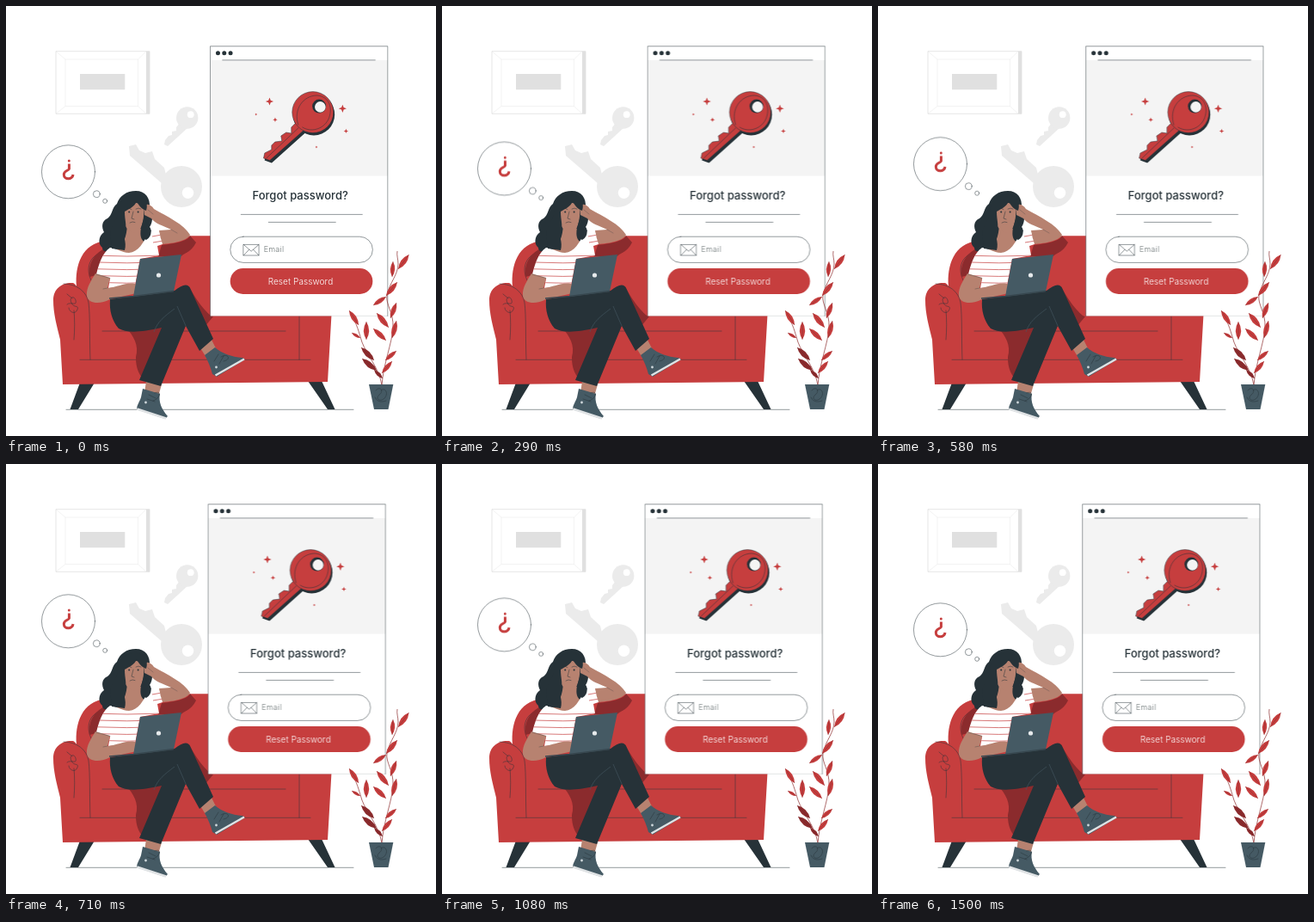
Recreate the animation shown at these times as an HTML page. Size 500 px wide and 500 px high, loop 1540 ms.

```html
<!DOCTYPE html>
<html lang="en">
<head>
<meta charset="utf-8">
<title>Forgot password</title>
<style>
  html, body { margin: 0; width: 100%; height: 100%; overflow: hidden; background: #fff; }
  svg { display: block; width: 100%; height: 100%; }
  text { font-family: Inter, "Open Sans", sans-serif; }
  .red { fill: #c63e3e; }
  .deep { fill: #8b2b2d; }
  .dark { fill: #263238; }
  .slate { fill: #455a64; }
  .skin { fill: #b78270; }
  .pale { fill: #ebebeb; }
  .white { fill: #fff; }
  .line { fill: none; stroke: #263238; stroke-width: .5; stroke-linecap: round; stroke-linejoin: round; }
  .frame { fill: none; stroke: #e0e0e0; stroke-width: .8; }
  .sole { fill: none; stroke: #e0e3e5; stroke-width: 2.4; }
</style>
</head>
<body>
<svg viewBox="0 0 500 500">
  <defs>
    <clipPath id="shirtClip">
      <path id="shirtShape" d="M121 281C112 287 108 300 105 312L121 317L119 328L150 325L156 294L178 290L176 279L182 277L177 260L166 263C160 275 154 286 143 287C134 287 128 281 121 281Z"/>
    </clipPath>
  </defs>

  <g id="picture">
    <path class="frame" d="M58 52.7H167V125.3H58Z"/>
    <path fill="#e0e0e0" d="M163 52.7H167V125.3H163Z"/>
    <path class="frame" stroke-opacity=".5" d="M69 62H153.5V116.5H69ZM58 52.7L69 62M163 52.7L153.5 62M58 125.3L69 116.5M163 125.3L153.5 116.5"/>
    <path fill="#e0e0e0" d="M86 79H138.3V97.2H86Z"/>
  </g>

  <g class="pale">
    <path d="M202 136L198 141V145L193 146L193 150L189 151L185 156L184 161L188 163L211 142Z"/>
    <circle cx="210.7" cy="130" r="12.7"/>
    <circle class="white" cx="214.7" cy="126.2" r="3.9"/>
    <path d="M143 163L151 161L155 168L162 171L170 169L173 178L184 188L190 212L181 206L144 174Z"/>
    <circle cx="204" cy="210" r="24"/>
    <circle class="white" cx="211.5" cy="217.3" r="6.7"/>
  </g>

  <path class="line" d="M70 469.3H404"/>

  <g id="sofa">
    <path class="dark" d="M86 438H103L84 469H74.5ZM351 436H367L382.5 469H374Z"/>
    <path class="red" d="M82 326C80 302 88 276 116 273C160 268 205 266 300 268L379 350L374 437L66 440L63 388C59 371 55 358 55 342C55 328 66 321 78 322C80 323 81 324 82 326Z"/>
    <path class="line" d="M67 323C82 323 94 332 96 345C98 360 97 390 98 411M99 319C92 304 98 291 110 287M86 411.3H354M112 378H325M341 361V411"/>
    <path class="line" d="M71 347C75 343 83 350 81 342C79 336 73 339 76 345C79 352 85 347 83 353C80 360 73 355 73 351M79 354C80 364 80 376 79 388M71 335L77 340"/>
    <path class="deep" d="M113 283L121 281L105 313L97 315C95 300 103 288 113 283ZM181 278C198 276 212 273 214 267L221 275C215 287 207 287 204 291L177 291Z"/>
    <path class="deep" d="M140 374H183L158 432C152 424 151 416 151 408C155 394 148 384 140 374ZM206 334L213 326C222 345 238 362 241 361L231 373L237 388Z"/>
  </g>

  <g id="woman">
    <path class="dark" d="M151 215C140 215 132 221 129 230C123 234 124 243 118 247C111 250 111 257 114 263C107 268 107 277 112 281C112 286 118 287 122 284C127 290 136 289 139 283C150 287 163 282 164 271C171 268 169 260 167 257C172 250 170 240 167 235C168 223 162 215 151 215Z"/>
    <path class="skin" d="M160 233C163 229 169 231 172 236C188 245 207 254 214 266C211 273 195 276 181 277L178 261L192 260C182 255 173 253 169 247L161 243Z"/>
    <path class="line" d="M192 260L199 264M165 237L171 242" stroke-opacity=".5"/>
    <path class="skin" d="M141 255L157 259C155 268 158 273 162 275C156 285 148 289 138 287C131 286 127 283 129 281C137 278 140 268 141 255Z"/>
    <use href="#shirtShape" fill="#fff"/>
    <g id="stripes" clip-path="url(#shirtClip)"></g>
    <path class="skin" d="M137 235C141 227 155 227 160 234C161 244 159 257 154 262C149 266 142 262 139 256C135 250 135 242 137 235Z"/>
    <path class="dark" d="M130 243C130 226 140 219 151 220C161 220 166 229 163 238C157 236 154 231 152 227C149 234 143 236 138 239C138 250 141 255 138 262C135 267 141 274 138 284L123 282L121 262Z"/>
    <path class="dark" d="M161 244C161 251 166 255 168 259C170 265 167 270 163 272C159 270 156 264 157 258Z"/>
    <path class="line" d="M140 236Q143 234 146 236.5M151 236Q154 234 157 236M148 239L146 247L149 248M144 252Q147 250 150 251.5"/>
    <circle class="dark" cx="143.2" cy="239.6" r="1"/>
    <circle class="dark" cx="153.6" cy="239.6" r="1"/>

    <path class="skin" d="M104 311L121 316L118 328C130 327 139 321 150 323L156 333L121 341C110 347 96 347 94 337C93 327 100 318 104 311Z"/>
    <path class="line" d="M105 312L121 316.5M118 328L113 329" stroke-opacity=".6"/>

    <path class="skin" d="M163 436L181 440L177 454L161 450ZM225 396L238 386L245 400L233 409Z"/>
    <path class="dark" d="M121 341L150 337L196 331C206 323 212 322 215 330L241 387L225 401L209 372L180 442L155 435L181 374C155 380 140 380 131 375C123 366 120 353 121 342Z"/>
    <path d="M172 379C176 367 184 361 196 352M209 372L199 349" fill="none" stroke="#455a64" stroke-width=".6"/>
    <path class="slate" d="M156 294L204 289L195 332L148 338Z"/>
    <path d="M120 340L148 337.5L195 331.5" fill="none" stroke="#37474f" stroke-width="1.6"/>
    <circle cx="177.5" cy="313" r="2.6" fill="#e6eaec"/>

    <path class="slate" d="M159 445L179 451C177 460 181 469 188 477L185 480L152 469C152 464 156 459 157 455Z"/>
    <path class="sole" d="M152.3 468.5L186 479.5"/>
    <path class="line" d="M166 452L174 456M164 457L173 460M173 450C182 446 179 457 171 459"/>
    <circle cx="162.5" cy="461" r="1.4" fill="#cfd8dc"/>
    <path class="slate" d="M231 406L243 397C251 404 262 408 275 409L278 411L245 431L240 428C238 420 235 413 231 406Z"/>
    <path class="sole" d="M243.5 429.5L277 410.5"/>
    <path class="line" d="M247 405L242 413M253 407L248 416M250 408C258 403 263 411 253 413"/>
    <circle cx="244.5" cy="420" r="1.4" fill="#cfd8dc"/>
  </g>

  <g id="panel">
    <path class="white" d="M237.7 46.8H444.1V360.4H237.7Z"/>
    <path d="M238 63H444V197.6H238Z" fill="#f4f4f4"/>
    <path class="line" d="M237.7 360.4V46.8H444.1V360.4M252 62.9H429.5M273.5 242.4H414.5M305.5 251.4H383.5"/>
    <path class="line" stroke-opacity=".25" d="M237.7 360.4H444.1"/>
    <g class="dark">
      <circle cx="246.7" cy="54.8" r="2.5"/>
      <circle cx="254" cy="54.8" r="2.5"/>
      <circle cx="261.3" cy="54.8" r="2.5"/>
    </g>
    <g id="key">
      <g class="dark" transform="translate(1.2 2.6)">
        <path d="M338 135L332 141V148L326 147L320 151L321 157L313 158L309 162V167L301 171L299.7 177L308 180L347 145Z"/>
        <circle cx="357" cy="123.6" r="24.2"/>
      </g>
      <path class="red" stroke="#263238" stroke-width=".5" d="M338 135L332 141V148L326 147L320 151L321 157L313 158L309 162V167L301 171L299.7 177L307 179.5L347 144Z"/>
      <circle class="red" cx="357" cy="123.6" r="24" stroke="#263238" stroke-width=".5"/>
      <path class="line" d="M303 177L340 142M340 138C334 120 346 104 362 104C376 105 381 119 375 132C369 144 354 147 345 141"/>
      <circle class="dark" cx="364.4" cy="116.6" r="8"/>
      <circle cx="365.6" cy="117.4" r="6.3" fill="#f4f4f4"/>
    </g>
    <g id="stars" class="red"></g>
    <text x="342.4" y="224.7" font-size="13" font-weight="500" text-anchor="middle" fill="#263238">Forgot password?</text>
    <rect class="line" x="261" y="268.2" width="165.6" height="30.2" rx="15.1"/>
    <path class="line" d="M276.5 277.4H294.3V290H276.5ZM276.5 277.4L285.4 285.2L294.3 277.4M276.5 290L283 283.2M294.3 290L287.8 283.2"/>
    <text x="299.9" y="286.3" font-size="9" letter-spacing=".25" font-weight="300" fill="#6b7475">Email</text>
    <rect class="red" x="260.9" y="305" width="165.7" height="30" rx="15"/>
    <text x="342.7" y="323.9" font-size="10" letter-spacing=".1" font-weight="300" text-anchor="middle" fill="#fff">Reset Password</text>
  </g>

  <g id="plant">
    <path fill="none" stroke="#8b2b2d" stroke-width=".7" d="M437 441C439 415 449 392 450 374C451 356 441 347 443 336C446 322 456 312 456 300C456 294 454 290 455 285M437 441C434 421 419 405 414 391C410 378 408 370 402 360"/>
    <g id="leaves"></g>
    <path class="slate" d="M422 440H450.3L444.5 469H428Z"/>
    <path class="line" d="M430 447C435 441 440 448 434 452C428 458 437 461 441 455C445 449 440 443 436 447M429 455C432 462 439 460 442 459"/>
  </g>

  <g id="bubble">
    <circle class="line" cx="72.5" cy="192.8" r="31"/>
    <circle class="line" cx="105.3" cy="218.7" r="3.9"/>
    <circle class="line" cx="115.2" cy="226.8" r="2.5"/>
    <circle class="red" cx="73.3" cy="179.9" r="1.5"/>
    <path d="M73.4 183.5V189.5C72.5 191.5 67.3 191.5 67.3 196C67.3 202.4 77.4 202.4 78 196" fill="none" stroke="#c63e3e" stroke-width="3"/>
  </g>
</svg>

<script>
const $ = id => document.getElementById(id);

function path(parent, d, attrs = {}) {
  const el = document.createElementNS("http://www.w3.org/2000/svg", "path");
  for (const [k, v] of Object.entries({ d, ...attrs })) el.setAttribute(k, v);
  $(parent).append(el);
}

// Four-pointed sparkle
function star(x, y, r) {
  const c = r * 0.28;
  path("stars", `M${x} ${y - r}L${x + c} ${y - c}L${x + r} ${y}L${x + c} ${y + c}` +
    `L${x} ${y + r}L${x - c} ${y + c}L${x - r} ${y}L${x - c} ${y - c}Z`);
}

// Leaf from base to tip
function leaf(x, y, tx, ty, cls = "red") {
  const dx = tx - x, dy = ty - y, w = 0.3;
  const side = s => `${x + dx * 0.5 - dy * w * s} ${y + dy * 0.5 + dx * w * s}`;
  path("leaves", `M${x} ${y}Q${side(1)} ${tx} ${ty}Q${side(-1)} ${x} ${y}Z`, { class: cls });
  path("leaves", `M${x} ${y}L${tx} ${ty}`, { stroke: "#6d2024", "stroke-width": 0.35 });
}

[[306.7, 111, 4.6], [391.6, 119.3, 4.6], [313.2, 132.3, 2.7],
 [395.6, 145.4, 2.7], [291, 126, 1.5], [361.2, 164, 1.5]].forEach(s => star(...s));

for (let y = 291; y < 330; y += 7.8)
  path("stripes", `M98 ${y - 1}Q140 ${y + 1} 185 ${y - 1}`, { fill: "none", stroke: "#c63e3e", "stroke-width": 0.7 });
path("stripes", "M170 268L181 266M171 275L183 273", { stroke: "#c63e3e", "stroke-width": 0.7 });

[[456, 306, 468.5, 289], [449, 315, 450, 297], [442, 337, 455, 321], [442, 338, 427, 348],
 [447, 363, 454, 345], [445, 374, 431, 357], [449, 386, 454, 366], [442, 389, 427, 375],
 [441, 412, 454, 401], [410, 371, 399, 354], [419, 388, 419, 367], [412, 386, 402, 380],
 [428, 412, 413, 397, "deep"], [431, 424, 414, 410, "deep"], [438, 433, 428, 423, "deep"],
 [437, 427, 449, 413]].forEach(l => leaf(...l));

const loop = { duration: 1540, delay: -35, iterations: Infinity };

// Horizontal shake in ten equal steps
const shake = [0, -1, 2, -4, 4, -4, 4, -4, 2, -1, 0];
$("panel").animate(shake.map((x, i) => ({
  transform: `translateX(${x}px)`,
  easing: i === 7 ? "ease-out" : "linear"
})), loop);

$("bubble").animate([0, -10, 0].map(y => ({
  transform: `translateY(${y}px)`,
  easing: "ease-in-out"
})), loop);
</script>
</body>
</html>
```
